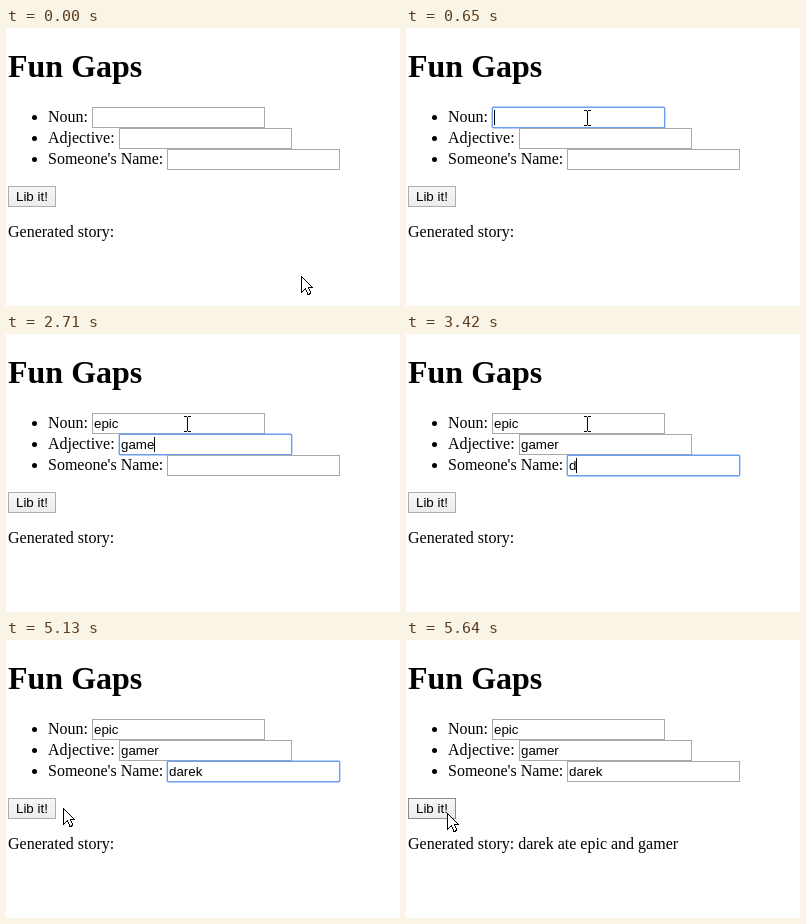
An HTML page that plays this animation: 394x278 px, repeating every 6840 ms.

```html
<!DOCTYPE html>
<html lang="en">
<head>
<meta charset="utf-8">
<title>Fun Gaps</title>
<style>
  html, body { margin: 0; width: 100%; height: 100%; overflow: hidden; background: #fff; }
  svg { display: block; }
  text { font: 16px "Liberation Serif", serif; white-space: pre; }
  .title { font-size: 32px; font-weight: bold; }
  .ui { font: 13.333px "Liberation Sans", Arial, sans-serif; }
  .box { fill: #fff; stroke: #a9a9a9; }
  .ring { fill: none; stroke: #6b9eee; stroke-width: 1.4; }
  .caret { fill: #000; }
</style>
</head>
<body>
<svg id="stage" width="394" height="278" viewBox="0 0 394 278">
  <defs>
    <linearGradient id="face" x2="0" y2="1">
      <stop stop-color="#f7f7f7"/><stop offset="1" stop-color="#ececec"/>
    </linearGradient>
  </defs>
  <text class="title" x="2" y="49">Fun Gaps</text>
  <g id="fields"></g>
  <rect id="button" x="2.5" y="158.5" width="47" height="20"/>
  <text class="ui" x="10" y="173">Lib it!</text>
  <text id="story" x="2" y="209"></text>
  <path id="arrow" fill="#fff" stroke="#000" shape-rendering="crispEdges"
    d="M.5 .5V16.5L4.5 12.5 7 18.5H8.5L9.5 16.5 7.5 11.5H11.5Z"/>
  <path id="beam" fill="none" stroke="#000" d="M-3-7.5h3m1 0h3M.5-7V7M-3 7.5h3m1 0h3"/>
</svg>
<script>
const LOOP = 6840, PRESS = 5490, CLICK = 5590, RELEASE = 5640;
const $ = id => document.getElementById(id);

// keys: the time at which each letter is typed
const fields = [
  { label: "Noun:", x: 86, y: 79, word: "epic", focus: 650, keys: [1050, 1380, 1560, 1610] },
  { label: "Adjective:", x: 113, y: 100, word: "gamer", focus: 2020, keys: [2350, 2480, 2630, 2710, 2910] },
  { label: "Someone's Name:", x: 161, y: 121, word: "darek", focus: 3090, keys: [3420, 3600, 3730, 3880, 4440] }
];
fields.forEach((f, i) => { f.blur = i < 2 ? fields[i + 1].focus : PRESS; });

$("fields").innerHTML = fields.map(({ label, x, y }) => `
  <circle cx="28.5" cy="${y + 10.5}" r="2.5"/>
  <text x="42" y="${y + 15}">${label}</text>
  <g>
    <rect class="box" x="${x + .5}" y="${y + .5}" width="172" height="20"/>
    <rect class="ring" x="${x + .3}" y="${y + .3}" width="172.4" height="20.4" rx="1"/>
    <text class="ui" x="${x + 2}" y="${y + 15}"></text>
    <rect class="caret" y="${y + 3}" width="1" height="15"/>
  </g>`).join("");
fields.forEach((f, i) => { f.node = $("fields").querySelectorAll("g")[i]; });

const show = (el, on) => el.setAttribute("visibility", on ? "visible" : "hidden");
const mix = (a, b, p) => Math.round(a + (b - a) * p);
const steps = (t, start, gap, n) => Math.max(0, Math.min(1, (Math.floor((t - start) / gap) + 1) / n));

function pointer(t) {
  if (t < 4800) {
    const p = steps(t, 30, 68.9, 9), e = p * p * (3 - 2 * p);
    return [mix(295, 181, e), mix(248, 90, e)];
  }
  const left = 1 - steps(t, 4800, 49.2, 13);
  return [mix(181, 41, 1 - left ** 2.8), mix(90, 173, 1 - left ** 3.6)];
}

function drawField(f, t) {
  const [, ring, text, caret] = f.node.children;
  const typed = f.keys.filter(k => k <= t);
  const focused = t >= f.focus && t < f.blur;
  const last = typed.length ? typed[typed.length - 1] : f.focus;
  text.textContent = f.word.slice(0, typed.length);
  show(ring, focused);
  show(caret, focused && Math.floor((t - last) / 500) % 2 === 0);
  const width = typed.length ? text.getComputedTextLength() : 0;
  caret.setAttribute("x", Math.round(f.x + 2 + width));
}

function draw(t) {
  fields.forEach(f => drawField(f, t));
  const [x, y] = pointer(t);
  const overText = y < 142;
  for (const id of ["arrow", "beam"]) $(id).setAttribute("transform", `translate(${x} ${y})`);
  show($("arrow"), !overText);
  show($("beam"), overText);

  const pressed = t >= PRESS && t < RELEASE;
  const hover = x < 50 && y > 157;
  $("button").setAttribute("fill", pressed ? "#e4e4e4" : "url(#face)");
  $("button").setAttribute("stroke", hover ? "#8c8c8c" : "#adadad");
  const [noun, adjective, name] = fields.map(f => f.word);
  $("story").textContent = "Generated story:" + (t >= CLICK ? ` ${name} ate ${noun} and ${adjective}` : "");
}

const start = performance.now();
function tick() {
  draw((performance.now() - start) % LOOP);
  requestAnimationFrame(tick);
}
tick();
</script>
</body>
</html>
```
